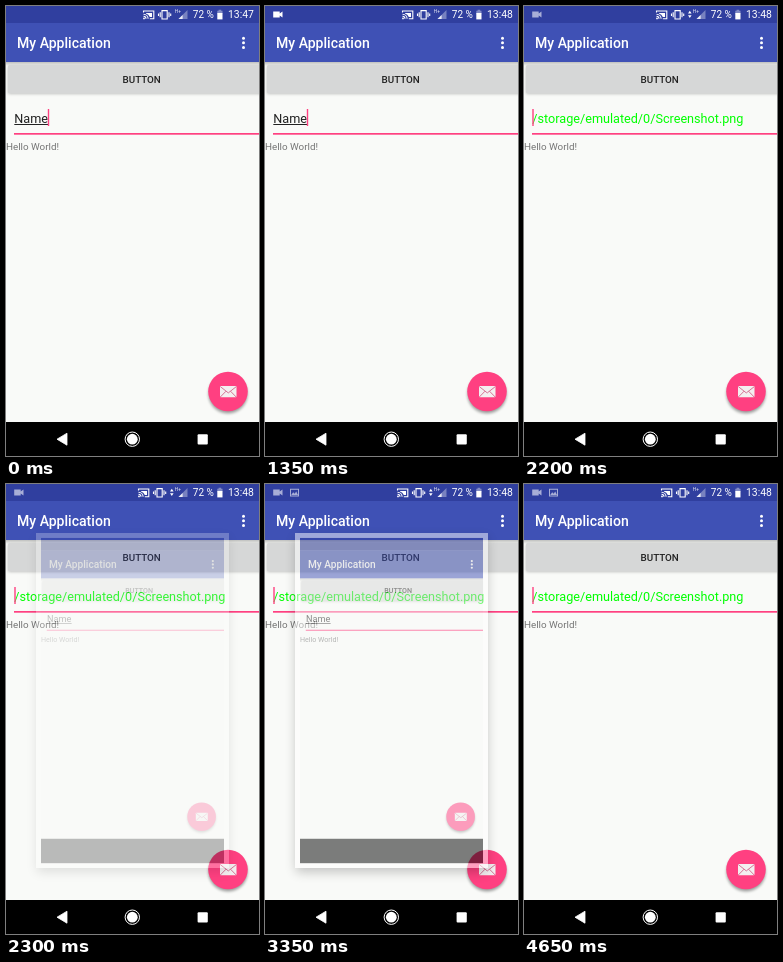
An HTML page that plays this animation: 253 px wide and 450 px high, repeating every 4.7 s.

```html
<!DOCTYPE html>
<html lang="en">
<head>
<meta charset="utf-8">
<style>
  html, body { margin: 0; width: 100%; height: 100%; overflow: hidden; background: #f9faf8; }
  svg { display: block; width: 100vw; height: 100vh; font-family: Roboto, sans-serif; }
  .medium { font-weight: 500; }
</style>
</head>
<body>
<svg viewBox="0 0 253 450" xmlns="http://www.w3.org/2000/svg">
  <defs>
    <filter id="soft" x="-20%" y="-20%" width="140%" height="150%"><feGaussianBlur stdDeviation="1.6"/></filter>
    <filter id="deep" x="-20%" y="-20%" width="140%" height="140%"><feGaussianBlur stdDeviation="6"/></filter>
    <linearGradient id="barShadow" x2="0" y2="1">
      <stop stop-opacity=".24"/><stop offset="1" stop-opacity="0"/>
    </linearGradient>
    <clipPath id="buttonClip"><rect x="2" y="59" width="268" height="28" rx="1.5"/></clipPath>
    <clipPath id="screenClip"><rect width="253" height="450"/></clipPath>

    <g id="toolbar">
      <rect y="56" width="253" height="4" fill="url(#barShadow)"/>
      <rect width="253" height="17.5" fill="#303f9f"/>
      <rect y="17" width="253" height="39" fill="#3f51b5"/>
      <text class="medium" x="11" y="42" font-size="14.05" fill="#fff">My Application</text>
      <g fill="#fff">
        <circle cx="237.5" cy="32.2" r="1.5"/><circle cx="237.5" cy="36.8" r="1.5"/><circle cx="237.5" cy="41.4" r="1.5"/>
      </g>
    </g>
    <g id="buttonFace">
      <rect x="2" y="60" width="268" height="28" rx="1.5" opacity=".22" filter="url(#soft)"/>
      <rect x="2" y="59" width="268" height="28" rx="1.5" fill="#d6d7d7"/>
    </g>
    <text id="buttonLabel" class="medium" x="135.7" y="76.8" font-size="9.84" text-anchor="middle" fill="#212121">BUTTON</text>
    <g id="nameText">
      <text x="8.3" y="117" font-size="12.65" fill="#212121">Name</text>
      <rect x="8.3" y="118" width="34" height="1" fill="#212121"/>
    </g>
    <g id="lower">
      <rect x="8" y="127" width="245" height="1.7" fill="#ff4081"/>
      <text x="0" y="144.3" font-size="9.84" fill="#757575">Hello World!</text>
      <circle cx="222" cy="388" r="19.5" opacity=".38" filter="url(#soft)"/>
      <circle cx="222" cy="385.5" r="19.8" fill="#ff4081"/>
      <rect x="214" y="380" width="16.5" height="11.3" rx=".8" fill="#f3eff0"/>
      <path d="M214.3 380.6l8 6.3 8-6.3M214.3 391l5.7-5.8M230.2 391l-5.7-5.8" fill="none" stroke="#d3668c" stroke-width=".9"/>
      <rect y="416" width="253" height="34"/>
    </g>
  </defs>

  <rect width="253" height="450" fill="#f9faf8"/>
  <use href="#toolbar"/>
  <use href="#buttonFace"/>
  <circle id="ripple" cx="135.7" cy="73" clip-path="url(#buttonClip)"/>
  <use href="#buttonLabel"/>
  <use id="name" href="#nameText"/>
  <text id="path" x="8.3" y="117" font-size="12.65" fill="#0f0">/storage/emulated/0/Screenshot.png</text>
  <rect id="caret" y="103" width="1.4" height="17" fill="#ff4081"/>
  <use href="#lower"/>

  <g fill="#fff">
    <path d="M61 427.2v12L51 433.2z" stroke="#fff" stroke-width=".8" stroke-linejoin="round"/>
    <circle cx="126.3" cy="433.2" r="5.4"/>
    <circle cx="126.3" cy="433.2" r="7.2" fill="none" stroke="#fff"/>
    <rect x="191.6" y="428.2" width="10.2" height="10.2" rx="1"/>
  </g>

  <g fill="#fff">
    <path id="camera" d="M8.2 5.6h6.5v2l2.8-2v6l-2.8-2v2H8.2z"/>
    <g id="picture" opacity=".58">
      <path fill-rule="evenodd" d="M25 4.8h9v7.6h-9zM26 5.8v5.6h7V5.8z"/>
      <path d="M26.2 11l2-2.8 1.5 1.6 1.5-2.2 1.8 3.4z"/>
    </g>
    <g id="shifting">
      <path d="M137.5 6.5V5h10.3v7.8h-4M137.5 8.2a4.6 4.6 0 0 1 4.6 4.6M137.5 10.3a2.5 2.5 0 0 1 2.5 2.5" fill="none" stroke="#fff" stroke-width="1.1"/>
      <path d="M140 6.9h6v4h-2.2a6 6 0 0 0-3.8-3.5z"/>
      <circle cx="138" cy="12.4" r=".9"/>
      <path d="M156 4.6h5.2v8.4H156zM154.2 6.3v5M152.5 7.5v2.6M163 6.3v5M164.7 7.5v2.6" fill="none" stroke="#fff" stroke-width="1.1"/>
    </g>
    <path id="arrows" d="M164 7.5l1.8-2.8 1.8 2.8zM164 9.3l1.8 2.8 1.8-2.8z"/>
    <text x="168.8" y="6.8" font-size="4.8" opacity=".9">H+</text>
    <path d="M181.5 4v9h-9z" opacity=".35"/>
    <path d="M176.6 8.9v4.1h-4.1z" opacity=".85"/>
    <text x="186.8" y="12.4" font-size="10">72 %</text>
    <path d="M212.6 3.8h2.6v1h1.3v2.7h-5.2V4.8h1.3z" opacity=".4"/>
    <rect x="211.3" y="7" width="5.2" height="6.4"/>
    <text id="clock" x="222" y="12.4" font-size="10.4"></text>
  </g>

  <g id="preview">
    <rect x="31" y="54" width="191" height="334" opacity=".45" filter="url(#deep)"/>
    <rect x="30" y="49" width="193" height="335" fill="#fff"/>
    <g transform="translate(35 53.8) scale(.7235)" clip-path="url(#screenClip)">
      <rect width="253" height="450" fill="#f9faf8"/>
      <use href="#toolbar"/>
      <use href="#buttonFace"/>
      <use href="#buttonLabel"/>
      <use href="#nameText"/>
      <use href="#lower"/>
    </g>
  </g>
</svg>
<script>
  const LOOP = 4700, STEP = 50;
  const el = Object.fromEntries([...document.querySelectorAll('svg > [id], svg > g [id]')].map(e => [e.id, e]));
  const set = (id, attrs) => Object.entries(attrs).forEach(([k, v]) => el[id].setAttribute(k, v));
  const show = (id, on) => set(id, { visibility: on ? 'visible' : 'hidden' });
  const ramp = (t, from, to) => Math.min(1, Math.max(0, (t - from) / (to - from)));
  const within = (t, spans) => spans.some(([a, b]) => t >= a && t < b);

  const caretOff = [[550, 750], [900, 1100], [2900, 3100], [3500, 3700], [3900, 4100], [4300, 4500]];
  const cameraDim = [[1900, 2450], [3300, 3850], [4350, LOOP]];

  function draw(t) {
    const saved = t >= 1900;
    const transferring = within(t, [[2000, 3700]]);

    show('name', !saved);
    show('path', saved);
    show('caret', !within(t, caretOff));
    set('caret', { x: saved ? 8.3 : 41.8 });

    el.clock.textContent = t < 50 ? '13:47' : '13:48';
    set('camera', { opacity: ramp(t, 0, 400) * (within(t, cameraDim) ? .58 : 1) });
    show('picture', t >= 2500);
    show('arrows', transferring);
    set('shifting', { transform: `translate(${transferring ? -5 : 0})` });

    set('ripple', {
      r: 136 * ramp(t, 1350, 1750),
      opacity: .11 * ramp(t, 1350, 1450) * (1 - ramp(t, 1800, 2100))
    });
    set('preview', { opacity: ramp(t, 2250, 2450) * (1 - ramp(t, 3250, 3450)) });
  }

  function tick() {
    draw(Math.floor(performance.now() % LOOP / STEP) * STEP);
    requestAnimationFrame(tick);
  }
  tick();
</script>
</body>
</html>
```
